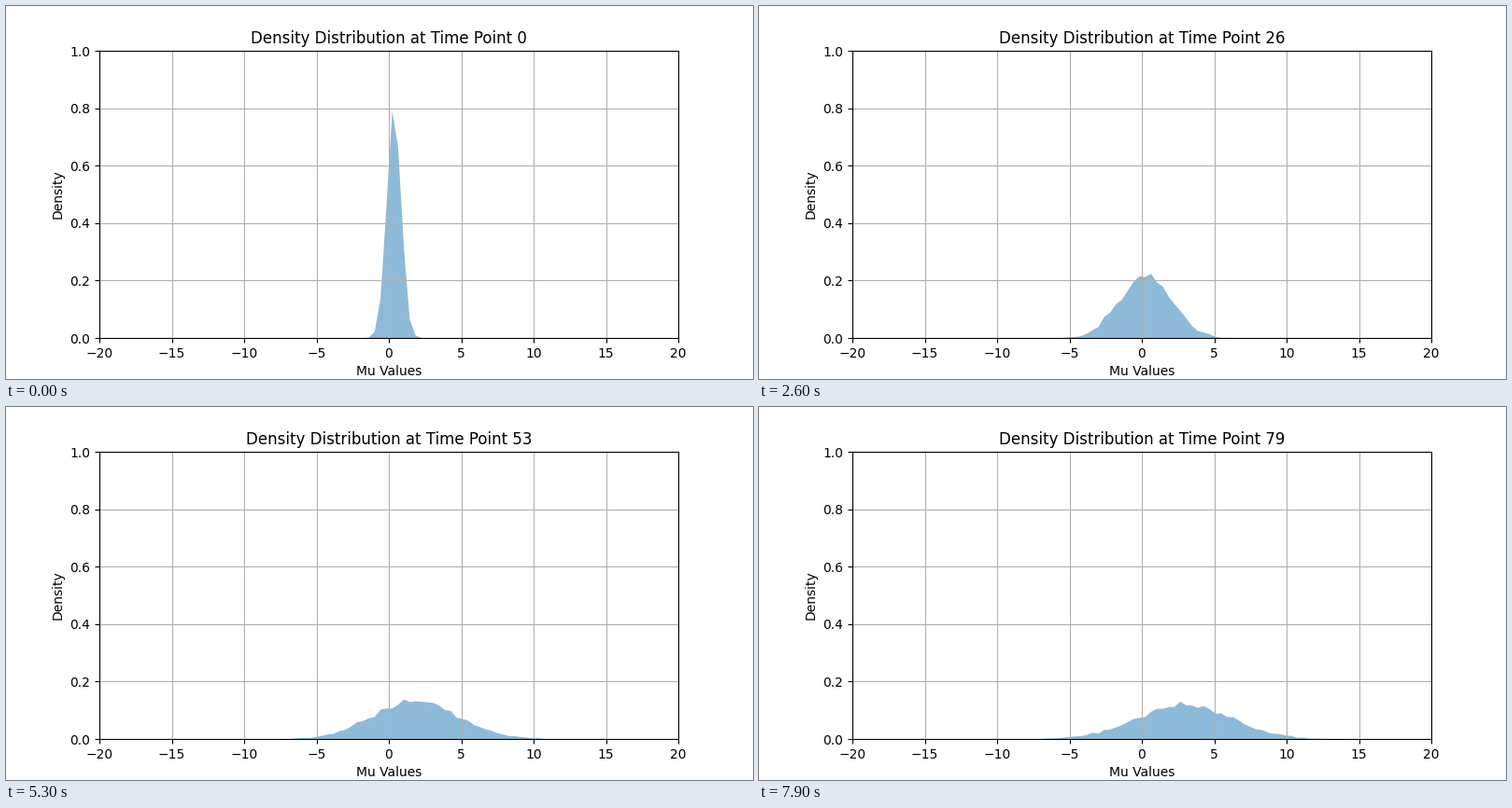
Recreate the animation shown at these times as a matplotlib script. Size 800 by 400 pixels, loop 8 s.

```python
import numpy as np
import matplotlib.pyplot as plt
from matplotlib.animation import FuncAnimation

STEPS = 80
INTERVAL = 100
SAMPLES = 9000
STRAGGLERS = 90

# Drift and spread of the cloud at a few moments, linear in between
T = [0, 20, 33, 41, 53, 61, 79]
MEAN = [0.31, 0.34, 0.15, 1.3, 1.87, 1.8, 2.9]
VAR = [0.23, 1.92, 4.8, 5.6, 8.8, 9.2, 11.5]

x = np.linspace(-20, 20, 100)
dx = x[1] - x[0]
edges = np.append(x - dx / 2, x[-1] + dx / 2)


def density(t):
    """Histogram of a seeded normal cloud with slightly heavy tails."""
    z = np.random.default_rng(100 + t).standard_normal(SAMPLES)
    z[:STRAGGLERS] *= 2.2
    cloud = np.interp(t, T, MEAN) + np.sqrt(np.interp(t, T, VAR)) * z
    counts, _ = np.histogram(cloud, bins=edges)
    return counts / (SAMPLES * dx)


fig, ax = plt.subplots(figsize=(8, 4), dpi=100)


def draw(t):
    ax.clear()
    ax.fill_between(x, density(t), color="tab:blue", alpha=0.5, linewidth=0)
    ax.set_xlim(-20, 20)
    ax.set_ylim(0, 1)
    ax.set_title(f"Density Distribution at Time Point {t}")
    ax.set_xlabel("Mu Values")
    ax.set_ylabel("Density")
    ax.grid(True)


anim = FuncAnimation(fig, draw, frames=STEPS, interval=INTERVAL,
                     repeat=True, repeat_delay=0)
plt.show()
```
